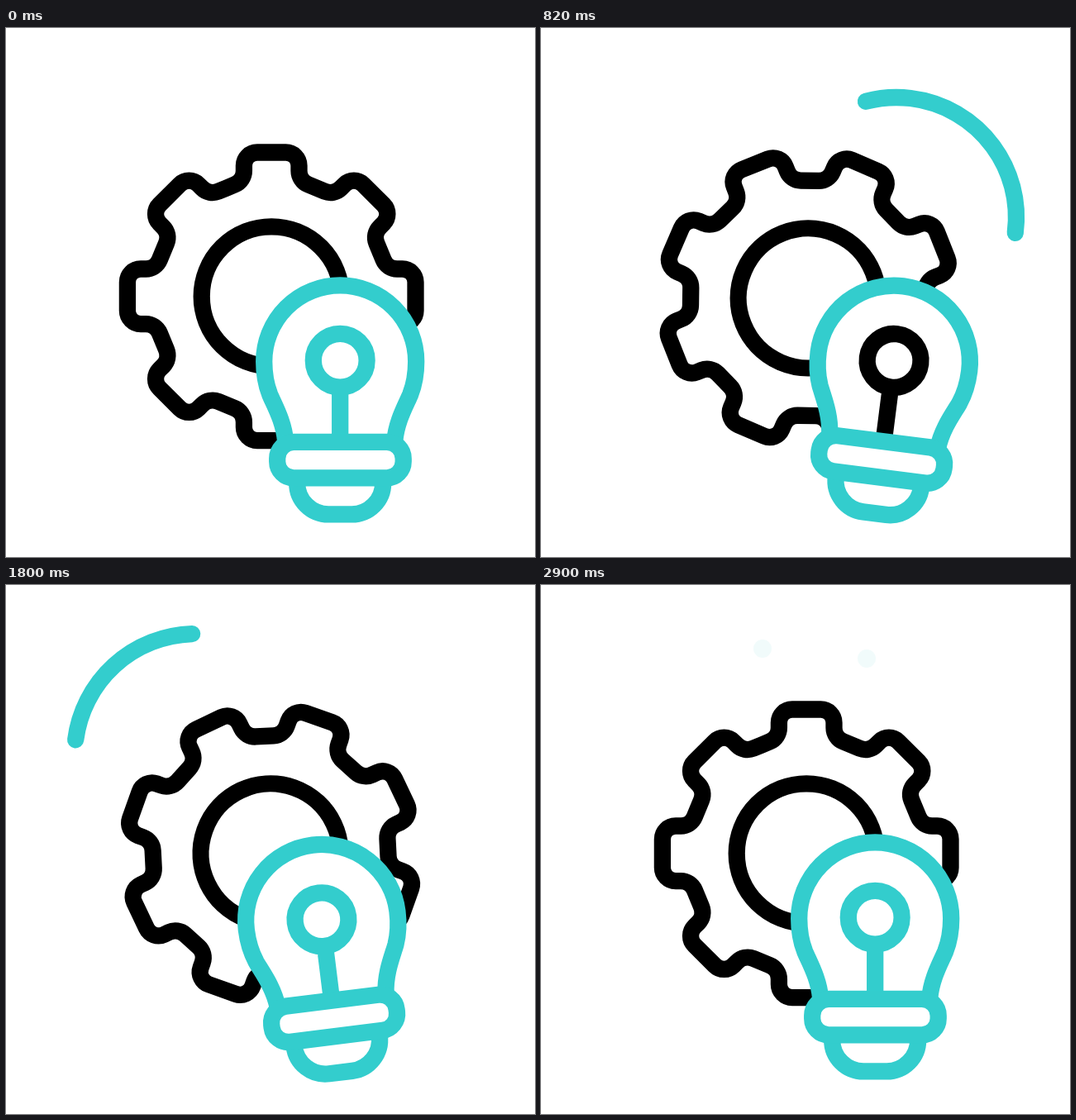
These frames come from a looping animation (640 px wide and 640 px high, 3.04 s). An HTML page with a canvas:

```html
<!DOCTYPE html>
<html lang="en">
<head>
<meta charset="utf-8">
<title>Gear and bulb</title>
<style>
html, body { margin: 0; width: 100%; height: 100%; overflow: hidden; background: #fff; }
canvas { display: block; }
</style>
</head>
<body>
<canvas id="stage" width="640" height="640"></canvas>
<script>
const ctx = document.getElementById('stage').getContext('2d');
const LOOP = 3040, STEP = 20, TEAL = '#33cdcd', BLACK = '#000';
const RAD = Math.PI / 180;

// Value at time t between [time, value] keys, eased in and out.
function key(t, ...keys) {
  if (t <= keys[0][0]) return keys[0][1];
  for (let i = 1; i < keys.length; i++) {
    const [t0, a] = keys[i - 1], [t1, b] = keys[i];
    if (t < t1) return a + (b - a) * (1 - Math.cos(Math.PI * (t - t0) / (t1 - t0))) / 2;
  }
  return keys[keys.length - 1][1];
}

function gearPath() {
  const corners = [[-33.3, -140, 18], [-33.3, -174.3, 16], [33.3, -174.3, 16], [33.3, -140, 18]];
  const pts = [];
  for (let i = 0; i < 8; i++) {
    const c = Math.cos(i * 45 * RAD), s = Math.sin(i * 45 * RAD);
    for (const [x, y, r] of corners) pts.push([x * c - y * s, x * s + y * c, r]);
  }
  const path = new Path2D();
  const [first, last] = [pts[0], pts[pts.length - 1]];
  path.moveTo((first[0] + last[0]) / 2, (first[1] + last[1]) / 2);
  pts.forEach(([x, y, r], i) => {
    const next = pts[(i + 1) % pts.length];
    path.arcTo(x, y, next[0], next[1], r);
  });
  path.closePath();
  path.moveTo(84.5, 0);
  path.arc(0, 0, 84.5, 0, 2 * Math.PI);
  return path;
}

const gear = gearPath();
const glass = new Path2D('M338 500C336 476 325 457 319 443Q312 425 312 403A92 92 0 0 1 496 403Q496 425 489 443C483 457 472 476 470 500');
const filament = new Path2D('M404 434V500M436.4 401.8A32.4 32.4 0 1 1 371.6 401.8A32.4 32.4 0 1 1 436.4 401.8');
const base = new Path2D('M352 546V550A38 38 0 0 0 390 588H418A38 38 0 0 0 456 550V546');
const band = new Path2D();
band.roundRect(328, 500.5, 152.5, 43.5, 20);

function turn(x, y, deg) {
  ctx.translate(x, y);
  ctx.rotate(deg * RAD);
  ctx.translate(-x, -y);
}

function shape(path, color, fill) {
  if (fill) {
    ctx.fillStyle = '#fff';
    ctx.fill(path);
  }
  ctx.strokeStyle = color;
  ctx.stroke(path);
}

function drawGear(t) {
  ctx.save();
  turn(320.7, 327.3, key(t, [240, 0], [1040, 82.8], [1950, -33], [2900, 0]));
  ctx.translate(321.2, 324.8);
  shape(gear, BLACK);
  ctx.restore();
}

function drawBulb(t) {
  const swing = [0, -10.2, 7.3, -10.2, 7.3, -10.2, 7.3, 0];
  ctx.save();
  turn(414, 583, key(t, ...swing.map((v, i) => [240 + i * 295.6, v])));
  ctx.translate(0.2, 0.4);
  ctx.lineCap = 'butt';
  shape(glass, TEAL, true);
  shape(filament, t >= 240 && t < 1640 ? BLACK : TEAL);
  shape(base, TEAL, true);
  shape(band, TEAL, true);
  ctx.restore();
}

// Part of a circle from tail to head, given as shares of the sweep.
function swoosh(x, y, r, start, sweep, tail, head) {
  if (head <= 0 || tail >= 1) return;
  ctx.beginPath();
  ctx.arc(x, y, r, (start + sweep * tail) * RAD, (start + sweep * head) * RAD, sweep < 0);
  ctx.strokeStyle = TEAL;
  ctx.stroke();
}

function drawDots(t) {
  if (t < 2420) return;
  const k = key(t, [2420, 0], [2900, 1]);
  ctx.globalAlpha = 0.5 - 0.43 * k;
  ctx.fillStyle = TEAL;
  for (const [x, y] of [[276 - 8 * k, 66 + 11 * k], [390 + 4 * k, 89]]) {
    ctx.beginPath();
    ctx.arc(x, y, 11, 0, 2 * Math.PI);
    ctx.fill();
  }
  ctx.globalAlpha = 1;
}

function draw(now) {
  const t = Math.floor(now % LOOP / STEP) * STEP;
  ctx.clearRect(0, 0, 640, 640);
  ctx.lineWidth = 20.3;
  ctx.lineCap = 'round';
  swoosh(430, 229, 145, -106, 113.5,
    key(t, [800, 0], [1105, 1]), key(t, [284, 0], [746, 1]));
  swoosh(230, 206, 147, -71.7, -101,
    key(t, [1710, 0], [2015, 1]), key(t, [1310, 0], [1772, 1]));
  drawDots(t);
  drawGear(t);
  drawBulb(t);
  requestAnimationFrame(draw);
}
requestAnimationFrame(draw);
</script>
</body>
</html>
```
